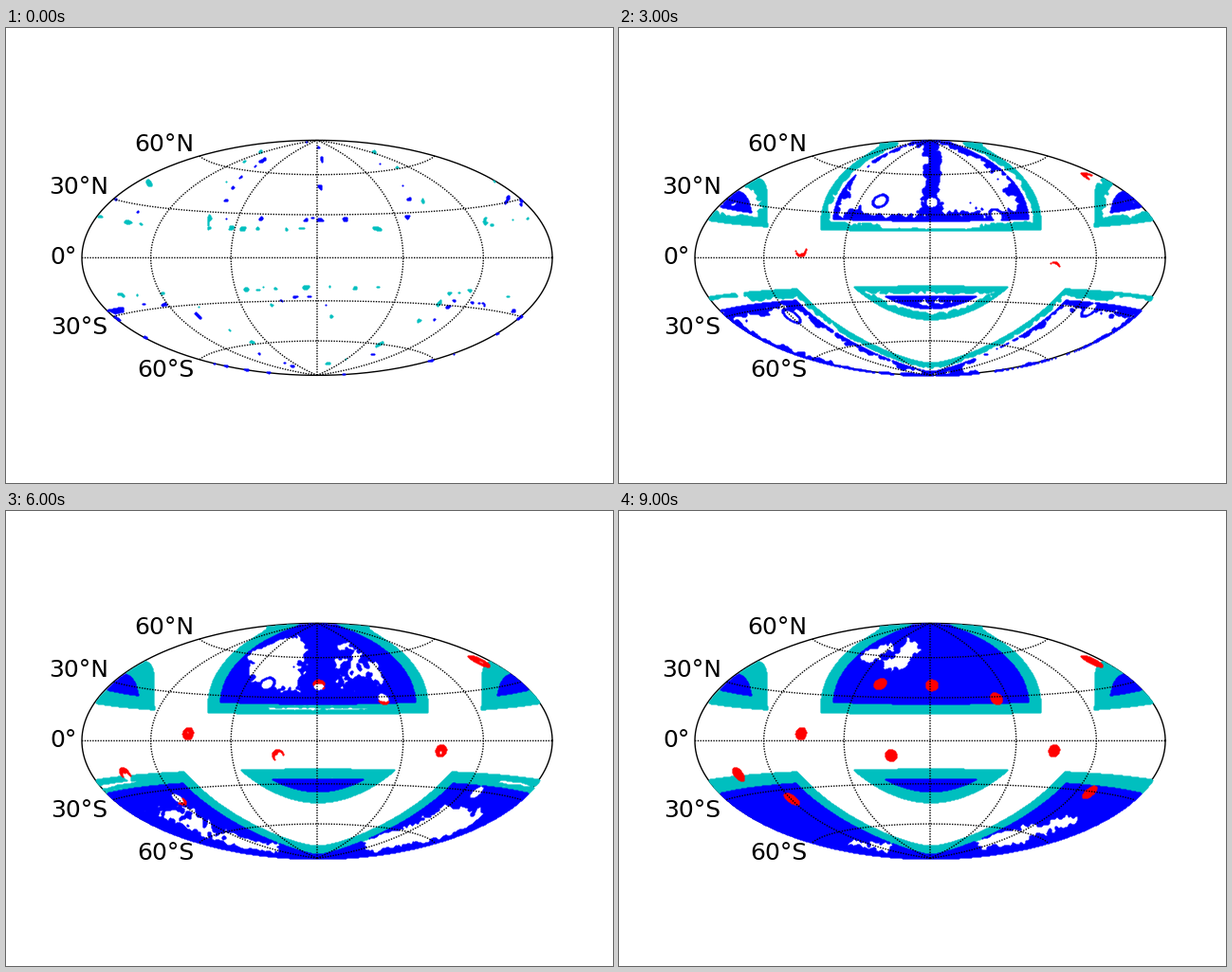
These frames come from a looping animation (640 by 480 pixels, 10 s). A matplotlib script:

```python
import numpy as np
import matplotlib.pyplot as plt
from matplotlib.animation import FuncAnimation

W, H, FRAMES = 640, 480, 10
CX, CY, A, B = 328.0, 242.4, 248.0, 124.0      # map ellipse
R2 = np.sqrt(2)
TILT = np.radians(29.7)                        # pole of the second belt
OUTER, INNER = (19.0, 17.2), (26.1, 25.2)      # excluded latitudes per belt
DISC = 3.9                                     # disc radius in degrees
LATEST, NEVER = 8.4, 99

rng = np.random.default_rng(7)
Y, X = np.mgrid[0:H, 0:W] + 0.5
inside = ((X - CX) / A) ** 2 + ((Y - CY) / B) ** 2 < 1


def hammer(lon, lat):
    lon, lat = np.radians(lon), np.radians(lat)
    k = np.sqrt(1 + np.cos(lat) * np.cos(lon / 2))
    return (CX + A * np.cos(lat) * np.sin(lon / 2) / k,
            CY - B * np.sin(lat) / k)


def unit(px, py):
    """Unit vector on the sphere for a stage position."""
    x = (px - CX) / A * 2 * R2
    y = (CY - py) / B * R2
    k = np.sqrt(np.maximum(1 - (x / 4) ** 2 - (y / 2) ** 2, 0.25))
    lon = 2 * np.arctan2(k * x, 2 * (2 * k * k - 1))
    lat = np.arcsin(np.clip(k * y, -1, 1))
    return np.array([np.cos(lat) * np.cos(lon),
                     np.cos(lat) * np.sin(lon), np.sin(lat)])


def height(s):
    """Angle above a great circle, in degrees, from its sine."""
    return np.degrees(np.arcsin(np.clip(np.abs(s), 0, 1)))


def bump(v, centre, width):
    return np.exp(-((v - centre) / width) ** 2)


def noise(size):
    """Smooth unit-variance noise with the given grain in pixels."""
    fy = np.fft.fftfreq(H)[:, None]
    fx = np.fft.fftfreq(W)[None, :]
    blur = np.exp(-2 * (np.pi * size) ** 2 * (fx ** 2 + fy ** 2))
    n = np.fft.ifft2(np.fft.fft2(rng.normal(size=(H, W))) * blur).real
    return n / n.std()


def seg(x0, y0, x1, y1):
    """Distance of each cell to a line segment."""
    dx, dy = x1 - x0, y1 - y0
    u = ((X - x0) * dx + (Y - y0) * dy) / (dx * dx + dy * dy)
    u = np.clip(u, 0, 1)
    return np.hypot(X - x0 - u * dx, Y - y0 - u * dy)


# Two excluded belts cut the sphere into the covered regions
sphere = unit(X, Y)
sx, sy, sz = sphere
lat = height(sz)
tilted = height(sx * np.cos(TILT) + sz * np.sin(TILT))
d_out = np.minimum(lat - OUTER[0], tilted - OUTER[1])
d_in = np.minimum(lat - INNER[0], tilted - INNER[1])
inner = inside & (d_in > 0)
band = inside & (d_out > 0) & (d_in <= 0)

fine, coarse, specks = noise(1.5), noise(5), noise(2.2)
rough = 0.7 * fine + 0.6 * coarse

# Arrival time of the border band: inwards, with a late seam
teal = 0.9 + 0.45 * d_out + 0.5 * rough + 1.6 * bump(d_out, 6, 0.6)
open_strip = (sx * sz > 0) & (np.abs(sy) < 0.55)
teal += 4.5 * open_strip * bump(lat, 22.5, 1.6)
teal = np.clip(teal, 0.3, LATEST)
teal[(d_out < 2.5) & (specks > 1.4)] = 0

# Arrival time of the interior: from the edges and the central meridian
d = np.minimum(d_in, height(sy))
blue = 1.2 + 7.5 * (1 - np.exp(-d / 16)) + 0.8 * rough
HOLES = [(260, 151, 286, 143, 6), (286, 162, 306, 144, 8),
         (385, 349, 478, 327, 7), (245, 349, 284, 355, 3)]
for *ends, width in HOLES:
    blue += 2 * bump(seg(*ends), 0, 2.5 * width)
blue = np.clip(blue, 0.3, LATEST)
blue[(d < 2.5) & (specks < -1.4)] = 0
for *ends, width in HOLES:
    blue[seg(*ends) + 2.5 * rough < width] = NEVER

# Discs: x, y, first time, direction (degrees, downwards) they start from
SITES = [(191, 234, 1.2, 80), (458, 252, 1.8, -70), (498, 157.5, 1.4, -160),
         (329, 183, 3.7, -90), (397, 197, 4.5, 80), (286, 257, 3.9, -130),
         (125, 277, 3.6, -110), (181, 303, 4.9, 40), (274.5, 181.5, 7.2, 0),
         (495.5, 296, 7.2, 180)]

red = np.full((H, W), float(NEVER))
for x, y, start, angle in SITES:
    cosine = np.tensordot(unit(x, y), sphere, 1)
    r = np.degrees(np.arccos(np.clip(cosine, -1, 1)))
    turn = np.arctan2(Y - y, X - x) - np.radians(angle)
    turn = np.abs(np.angle(np.exp(1j * turn))) / np.pi
    t = start + 3 * turn + 3.2 * (1 - r / DISC) + 0.15 * fine
    disc = r < DISC
    red[disc] = np.minimum(t, 8.9)[disc]
    blue[disc] = teal[disc] = NEVER
    rim = (r >= DISC) & (r < DISC + 1.1)
    blue[rim] = np.minimum(blue, 1.5 + 0.25 * fine)[rim]
teal[~band] = NEVER
blue[~inner] = NEVER
red[~inside] = NEVER

# Stage
fig = plt.figure(figsize=(6.4, 4.8), dpi=100, facecolor="white")
ax = fig.add_axes([0, 0, 1, 1])
ax.set_xlim(0, W)
ax.set_ylim(H, 0)
ax.axis("off")

a = np.linspace(0, 2 * np.pi, 400)
ax.plot(CX + A * np.cos(a), CY + B * np.sin(a), "k", lw=1, zorder=1)

grid = dict(color="k", lw=1, dashes=[1, 1], zorder=5, snap=False)
lons, lats = np.linspace(-180, 180, 361), np.linspace(-90, 90, 181)
for p in range(-60, 61, 30):
    ax.plot(*hammer(lons, p), **grid)
    lx, ly = hammer(-180, p)
    side = "N" if p > 0 else "S" if p < 0 else ""
    va = "bottom" if p > 0 else "top" if p < 0 else "center"
    ax.text(lx - 5.5, ly - 0.5, f"{abs(p)}°{side}", ha="right", va=va,
            fontsize=18, family="DejaVu Sans")
for m in range(-120, 121, 60):
    ax.plot(*hammer(m, lats), **grid)

layers = []
for z, (color, t) in enumerate([("c", teal), ("b", blue), ("r", red)]):
    dots, = ax.plot([], [], color=color, ls="", marker="o", ms=1.5, mew=0,
                    zorder=2 + 0.5 * z)
    layers.append((dots, t))


def draw(k):
    for dots, t in layers:
        shown = t <= k
        dots.set_data(X[shown], Y[shown])
    return [dots for dots, _ in layers]


anim = FuncAnimation(fig, draw, frames=FRAMES, interval=1000, repeat=True)
plt.show()
```
